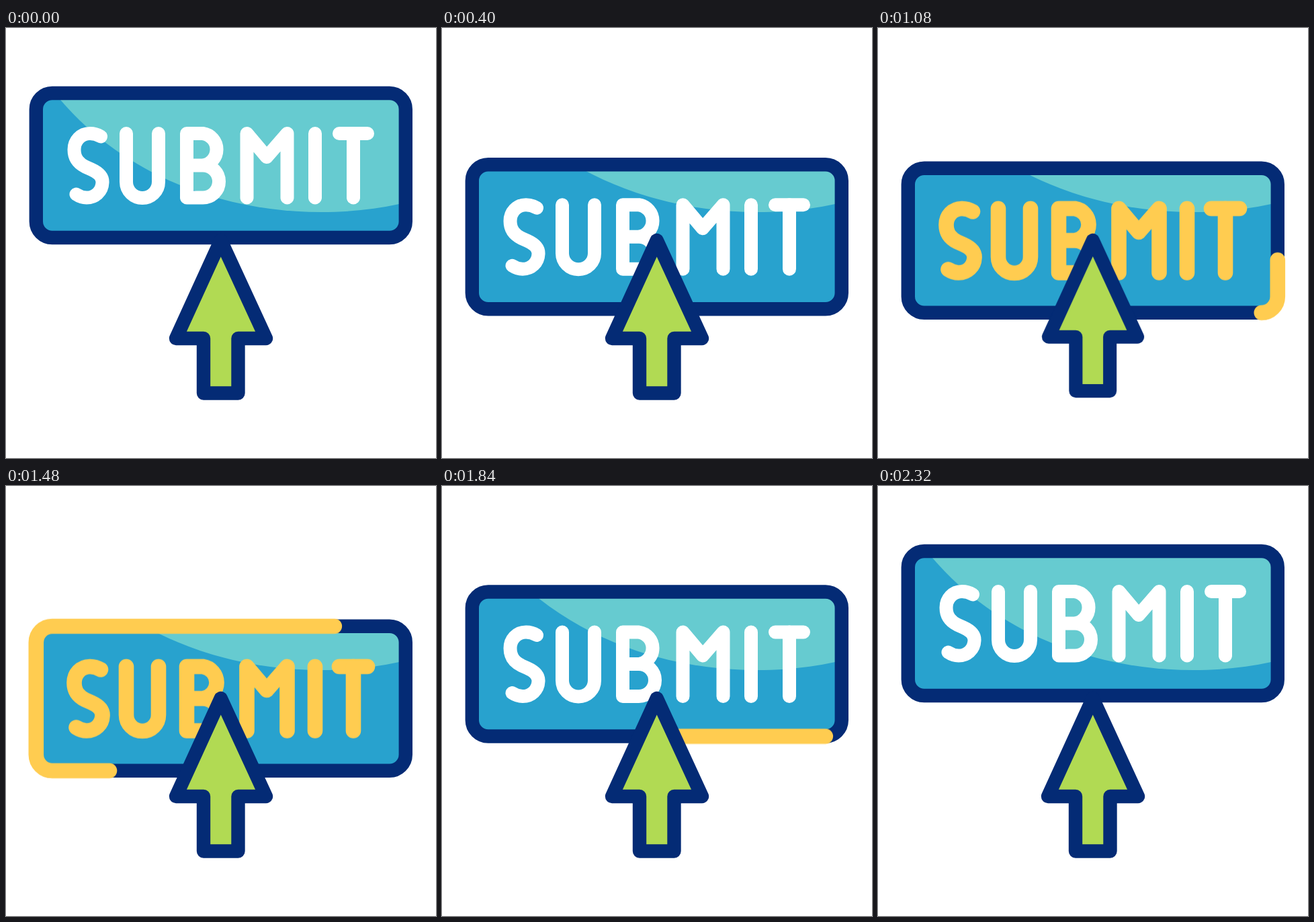
These frames come from a looping animation (640 px wide and 640 px high, 2560 ms). An HTML page without scripts:

```html
<!DOCTYPE html>
<html lang="en">
<head>
<meta charset="utf-8">
<title>Submit button</title>
<style>
  @property --drop { syntax: '<length>'; inherits: true; initial-value: 0px; }
  @property --frame-head { syntax: '<length>'; inherits: true; initial-value: 0px; }
  @property --frame-tail { syntax: '<length>'; inherits: true; initial-value: 0px; }
  @property --text-head { syntax: '<length>'; inherits: true; initial-value: 0px; }
  @property --text-tail { syntax: '<length>'; inherits: true; initial-value: 0px; }

  html, body { margin: 0; width: 100%; height: 100%; overflow: hidden; background: #fff; }

  svg {
    --smooth: cubic-bezier(.333, 0, .667, 1);
    --settle: cubic-bezier(.333, 0, .167, 1);
    --navy: #042b75;
    display: block;
    width: 100%;
    height: 100%;
    fill: none;
    stroke-linecap: round;
    stroke-linejoin: round;
    animation: drop 2560ms infinite var(--settle),
      frame-head 2560ms infinite var(--smooth),
      frame-tail 2560ms infinite var(--smooth),
      text-head 2560ms infinite var(--smooth),
      text-tail 2560ms infinite var(--smooth);
  }

  .button { transform: translateY(var(--drop)); }
  .shine { transform: translateY(calc(-1 * var(--drop))); }
  .border { stroke: var(--navy); stroke-width: 20.4; }
  .label { stroke: #fff; stroke-width: 20; }
  .glow { stroke: #ffcc50; stroke-width: 22.6; }

  .frame-glow {
    stroke-dasharray: calc(var(--frame-head) - var(--frame-tail)) 200px;
    stroke-dashoffset: calc(-1 * var(--frame-tail));
    animation: frame-show 2560ms infinite step-end;
  }
  .text-glow {
    stroke-dasharray: calc(var(--text-head) - var(--text-tail)) 200px;
    stroke-dashoffset: calc(-1 * var(--text-tail));
    animation: text-show 2560ms infinite step-end;
  }
  .arrow {
    fill: #b1da53;
    stroke: var(--navy);
    stroke-width: 20.4;
    transform-origin: 320px 306px;
    animation: click 2560ms infinite var(--smooth);
  }

  @keyframes drop {
    0%, 90.625%, 100% { --drop: 0px; }
    21.875%, 64.0625% { --drop: 111.7px; }
  }
  @keyframes click {
    0%, 20.3125%, 45.3125%, 100% { transform: scale(1); }
    32.8125% { transform: scale(.906); }
  }
  @keyframes frame-head {
    0%, 37.5% { --frame-head: 0px; }
    68.75%, 100% { --frame-head: 100px; }
  }
  @keyframes frame-tail {
    0%, 48.4375% { --frame-tail: 0px; }
    79.6875%, 100% { --frame-tail: 100px; }
  }
  @keyframes text-head {
    0%, 28.125% { --text-head: 0px; }
    40.625%, 100% { --text-head: 100px; }
  }
  @keyframes text-tail {
    0%, 57.8125% { --text-tail: 0px; }
    70.3125%, 100% { --text-tail: 100px; }
  }
  @keyframes frame-show {
    0%, 79.65%, 100% { opacity: 0; }
    37.55% { opacity: 1; }
  }
  @keyframes text-show {
    0%, 70.27%, 100% { opacity: 0; }
    28.18% { opacity: 1; }
  }
</style>
</head>
<body>
<svg viewBox="0 0 640 640" role="img" aria-label="Submit">
  <defs>
    <clipPath id="face"><rect x="44.8" y="97" width="550" height="215" rx="24"/></clipPath>
    <g id="letters">
      <path pathLength="100" d="M141 161.500C136 158.500 131 157 125 157C111 157 101.500 168 101.500 181C101.500 195 109 202 118 206.500L127 210.500C137 215 144 221 143.500 230C143 243 133 252.500 120 252.500C114 252.500 109 250.500 104.500 247.500"/>
      <path pathLength="100" d="M179 157V229A24 24 0 0 0 227 229V157"/>
      <path pathLength="100" d="M269 204.500H293A24 24 0 0 0 293 157H269V252.500H293A24 24 0 0 0 293 204.500"/>
      <path pathLength="100" d="M358.500 252.500V157L388 192L418.500 157V252.500"/>
      <path pathLength="100" d="M460 157V252.500"/>
      <path pathLength="100" d="M496 157H538"/>
      <path pathLength="100" d="M517 157V252.500"/>
    </g>
  </defs>

  <g class="button">
    <g clip-path="url(#face)">
      <rect x="40" y="90" width="560" height="230" fill="#28a2ce"/>
      <path class="shine" fill="#66cbd0" d="M70 94L81 107C176 218 320 274 470 274C510 274 549 270 585 262L600 258V94Z"/>
    </g>
    <rect class="border" x="44.8" y="97" width="550" height="215" rx="24"/>
    <use class="label" href="#letters"/>
    <use class="glow text-glow" href="#letters"/>
    <path class="glow frame-glow" pathLength="100" d="M570.800 312A24 24 0 0 0 594.800 288V121A24 24 0 0 0 570.800 97H68.800A24 24 0 0 0 44.800 121V288A24 24 0 0 0 68.800 312H570.800"/>
  </g>

  <path class="arrow" d="M319.700 316L387 462H345.500V543.500H294V462H253Z"/>
</svg>
</body>
</html>
```
